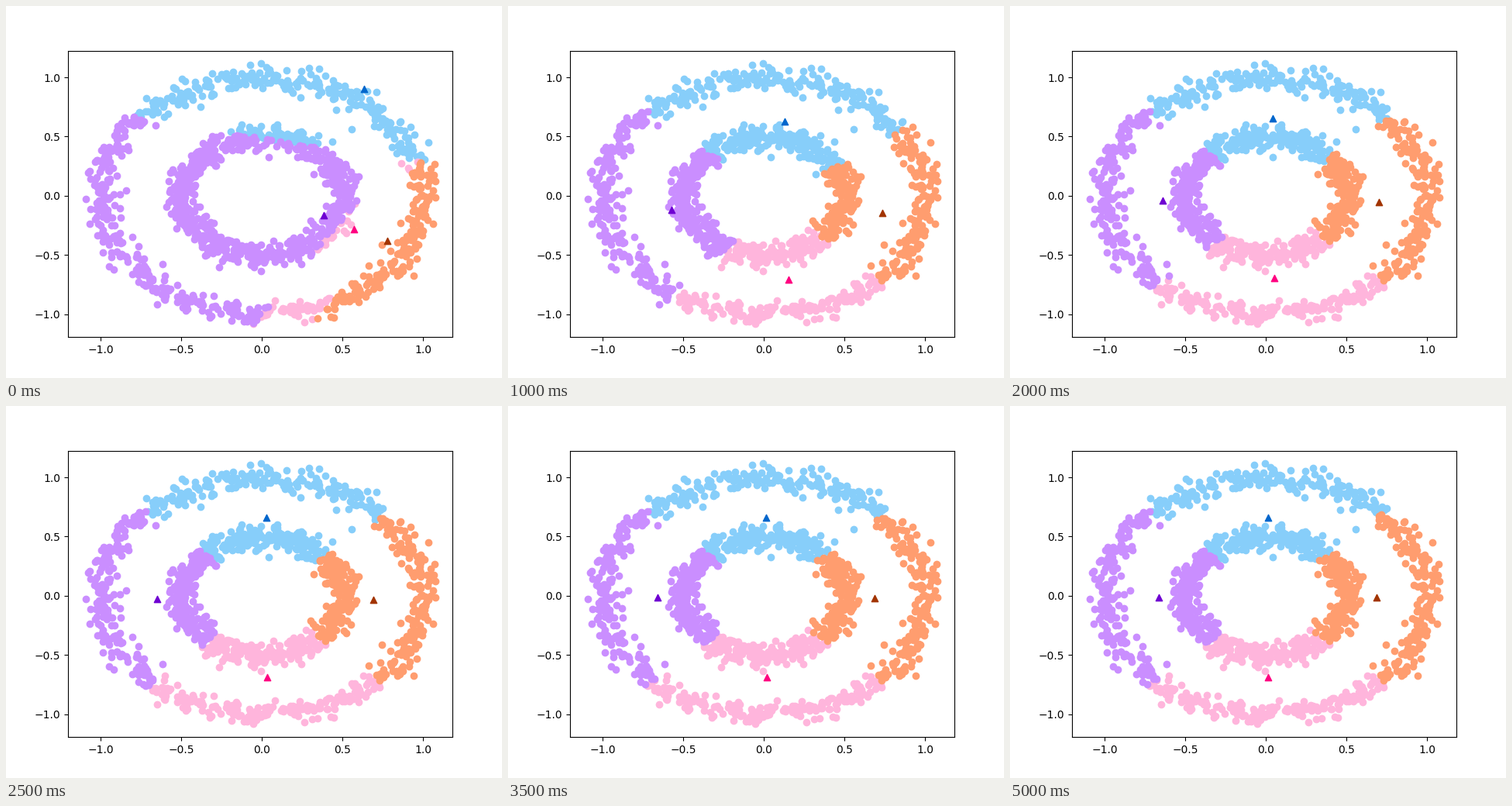
A matplotlib script that plays this animation: 640 by 480 pixels, repeating every 6 s.

```python
import numpy as np
import matplotlib.pyplot as plt
from matplotlib.animation import FuncAnimation

W, H, DPI = 640, 480, 100
N = 1500
STEP_MS = 500
FRAMES = 12
LAST_STEP = 10

# dot colour, centre colour: blue, pink, orange, purple (bottom to top)
COLORS = [("#87CEFA", "#0066CC"), ("#FFB5DC", "#FF0080"),
          ("#FF9D6F", "#A23400"), ("#CA8EFF", "#6F00D2")]

# Centres at the first steps; afterwards they settle into an upright cross
EARLY = np.array([
    [(0.635, 0.900), (0.572, -0.284), (0.779, -0.383), (0.385, -0.167)],
    [(0.169, 0.737), (0.303, -0.710), (0.827, -0.408), (-0.230, -0.125)],
    [(0.130, 0.625), (0.150, -0.711), (0.736, -0.148), (-0.572, -0.121)],
])
REST = np.array([0.01, -0.012]) + 0.675 * np.array([(0, 1), (0, -1), (1, 0), (-1, 0)])
DECAY = 0.53


def noisy_rings(factor=0.5, noise=0.05):
    """Two concentric rings of evenly spaced points with gaussian jitter."""
    rng = np.random.RandomState(0)
    t = np.linspace(0, 2 * np.pi, N // 2, endpoint=False)
    ring = np.column_stack([np.cos(t), np.sin(t)])
    order = np.arange(N)
    rng.shuffle(order)
    jitter = rng.normal(scale=noise, size=(N, 2))
    return np.vstack([ring, factor * ring])[order] + jitter


def centres_at(frame):
    step = min(frame, LAST_STEP)
    settled = step - (len(EARLY) - 1)
    if settled <= 0:
        return EARLY[step]
    return REST + (EARLY[-1] - REST) * DECAY ** settled


def nearest(points, centres):
    offset = points[:, None] - centres[None]
    return np.hypot(offset[..., 0], offset[..., 1]).argmin(axis=1)


fig, ax = plt.subplots(figsize=(W / DPI, H / DPI), dpi=DPI)
ax.set_xlim(-1.2035, 1.181)
ax.set_ylim(-1.1935, 1.2254)

cloud = noisy_rings()
dots = [ax.scatter([], [], color=c) for c, _ in COLORS]
marks = [ax.scatter([], [], color=c, marker="^") for _, c in COLORS]


def draw(frame):
    centres = centres_at(frame)
    label = nearest(cloud, centres)
    for k, (dot, mark) in enumerate(zip(dots, marks)):
        dot.set_offsets(cloud[label == k])
        mark.set_offsets(centres[k:k + 1])
    return dots + marks


anim = FuncAnimation(fig, draw, frames=FRAMES, interval=STEP_MS,
                     init_func=lambda: draw(0), repeat=True, repeat_delay=0)
plt.show()
```
